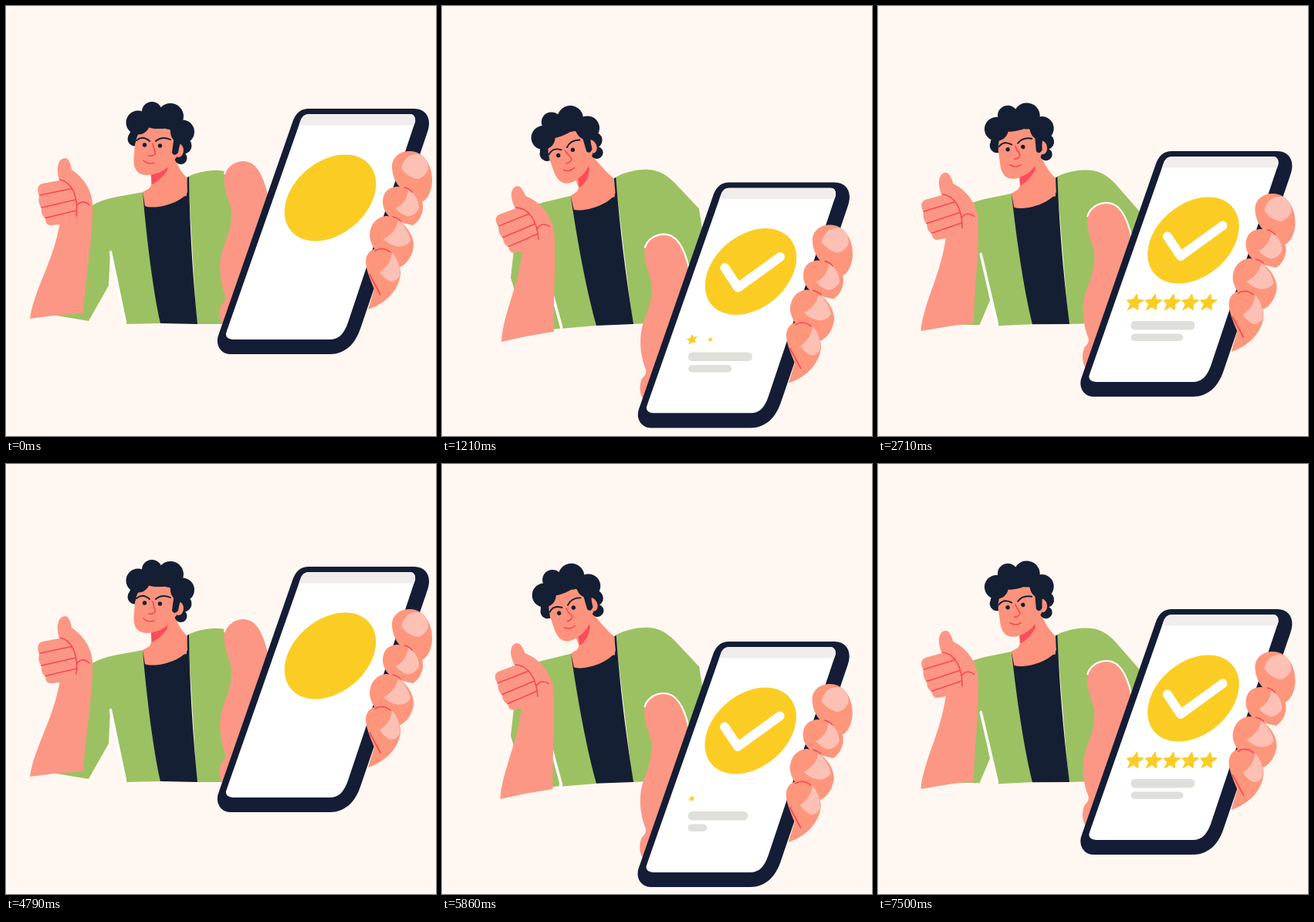
An HTML page that plays this animation: 557x557 px, repeating every 9.57 s.

```html
<!DOCTYPE html>
<html lang="en">
<head>
<meta charset="utf-8">
<title>Thumbs up</title>
<style>
  html, body { margin: 0; width: 100%; height: 100%; overflow: hidden; background: #fff7f1; }
  svg { display: block; width: 100vw; height: 100vh; }
  .green { fill: #9cc162; }
  .dark { fill: #151f33; }
  .skin { fill: #fc9785; }
  .face { fill: #fd937c; }
  .tip { fill: #fe967c; }
  .nail { fill: #fdc0b5; }
  .gold { fill: #fbcd24; }
  .grey { fill: #dfe0da; }
  .line { fill: none; stroke-linecap: round; stroke-linejoin: round; }
  .red { stroke: #ff4455; stroke-width: 1.6; }
  .white { stroke: #fff; }
  .brow { stroke: #151f33; stroke-width: 1.9; }
</style>
</head>
<body>
<svg viewBox="0 0 557 557">
  <defs>
    <clipPath id="screen"><path d="M392 140H524Q531 141 530 150L443 410C438 424 432 432 419 432H294Q284 431 285 424L287 418L381 150Q384 140 392 140Z"/></clipPath>
  </defs>

  <path id="sleeve" class="green"/>
  <g id="body">
    <path class="green" d="M178 241L150 246Q125 250 112 258L122 312L136 316L156 412L202 411Z"/>
    <path class="line white" stroke-width="3.6" d="M135.5 319L154.5 410"/>
    <path class="green" d="M236 221C250 214 268 212 280 213.5C294 215 304 223 312 232L342 268L345 300L300 412H247Z"/>
    <path class="face" d="M177 241L188 235L234 222L237 246L205 268L178 262Z"/>
    <path class="dark" d="M177 241L180 259C190 264 226 257 235 241L234.5 222L237 221C238 290 242 350 248 412L200 411C190 366 182 300 177 241Z"/>
  </g>
  <path id="neck" class="face"/>
  <path id="shade" fill="#fc4c5b"/>

  <g id="head">
    <g class="dark">
      <circle cx="167" cy="172" r="9.5"/><circle cx="230" cy="181" r="10.5"/><circle cx="226.500" cy="197" r="8"/>
    </g>
    <path class="face" d="M169 158L167 180L165.5 199Q165 219 183 219Q199 218 209 209L221 196L222 156Z"/>
    <ellipse class="face" cx="223.500" cy="187" rx="6.500" ry="9"/>
    <g class="dark">
      <circle cx="171" cy="151" r="15.5"/><circle cx="189" cy="137" r="13"/>
      <circle cx="213" cy="143" r="17"/><circle cx="228.500" cy="163" r="15.5"/>
      <ellipse cx="198" cy="148" rx="26" ry="11"/>
      <path d="M160 165L167.500 178Q169 166 178 157L172 145Z"/>
      <path d="M205 152L218 167L215 190Q218 196 223 190Q225 176 230 172L228 152Z"/>
      <circle cx="179.5" cy="180" r="2.7"/><circle cx="199.5" cy="181" r="2.7"/>
    </g>
    <path class="line brow" d="M169 174Q177 167 186 175M194 175Q202 168 213 173"/>
    <path class="line red" d="M190 178Q191 184 193.5 190Q192 195 185 194M178 200Q184 206 192 203"/>
  </g>

  <g id="arm">
    <path class="skin" d="M31 405C36 368 62 330 70 280L90 250L112 256C113 300 104 340 100 398Q65 400 31 405Z"/>
    <g id="fist">
      <path class="skin" d="M70 283L58 284Q51 284 51 275Q45 271 46 262Q41 256 43 246Q38 233 47 230L69 226Q66 216 67 208Q69 197 77 197Q83 198 85 212C100 222 111 238 112 256L111 282Z"/>
      <path class="line red" d="M44 245L85 236.5M46 261L90 251M51 274.5L91 265M70 225C85 228 94 246 91 272M92 258C97 252 103 253 108 258"/>
    </g>
  </g>

  <g id="phone">
    <path class="skin" d="M283 218C286 207 296 200 308 200C326 200 336 225 341 248L345 290L300 415H281C276 406 275 398 279 387Q286 381 284 375C278 360 275 340 279 322C283 305 292 292 292 268C292 255 280 238 283 218Z"/>
    <path class="line white" stroke-width="2.2" d="M283 217C286 207 296 200 308 200C326 200 335 222 340 244"/>
    <path fill="#141d35" d="M392 133H529C543 133 550 144 547.5 157Q547 160 545 166L459 418C452 439 438 451 420 451H291C280 451 273 442 274 432Q274 429 276 424L372 148Q378 133 392 133Z"/>
    <g clip-path="url(#screen)">
      <path fill="#fff" d="M270 130H560V440H270Z"/>
      <path fill="#f1eded" d="M360 130H560V154.5H360Z"/>
    </g>
    <circle class="gold" r="56" transform="translate(420 248.5) skewX(-19)"/>
    <path id="check" class="line white" stroke-width="12" pathLength="100" d="M386.5 243.5L403.5 269L458 229.5"/>
    <rect id="bar1" class="grey" x="339" y="353" height="11.5"/>
    <rect id="bar2" class="grey" x="339" y="369.5" height="9.5"/>
    <g id="stars" class="gold" stroke="#fbcd24" stroke-width="1.4" stroke-linejoin="round"></g>
    <g class="tip">
      <path d="M466 330C467 320 473 314 483 314C500 316 512 332 511 348C508 370 490 386 469 393L477 367C471 352 466 341 466 330Z"/>
      <path d="M471 296C472 281 482 272 494 272C513 276 529 294 528 312C526 324 520 333 511 338L492 328C479 320 471 308 471 296Z"/>
      <path d="M488 254C488 240 497 234 508 234C526 235 541 245 540 262C539 272 534 280 527 284L505 279C495 274 488 264 488 254Z"/>
      <path d="M500 210C499 196 510 188 523 188C542 188 553 208 552 228C551 242 545 252 538 254L520 242C508 236 501 224 500 210Z"/>
    </g>
    <g class="nail">
      <path d="M512 210C515 198 522 192 531 192C541 192 547 200 547 212C543 220 537 224 532 224C524 222 516 217 512 210Z"/>
      <path d="M505 262C515 257 520 248 521 238C530 243 535 252 535 262C531 270 524 273 519 272Q510 269 505 262Z"/>
      <path d="M489 302C500 296 506 288 508 278C518 286 523 296 524 304C519 311 511 313 505 311Q496 309 489 302Z"/>
      <path d="M484 345C494 338 499 330 500 319C508 328 511 340 510 350C505 357 500 358 496 356Q489 352 484 345Z"/>
    </g>
    <path class="line red" d="M516 235Q522 236 526 241M501 273Q506 274 511 278M478 317Q488 311 498 319M471 348L485 374"/>
  </g>
</svg>

<script>
// Time n counts steps of 1/14 s; each cycle rises, dips, settles and holds.
const LOOP = 9570, FPS = 14, CYCLE = 67;
const $ = id => document.getElementById(id);
const clamp = v => Math.max(0, Math.min(1, v));
const smooth = v => (v = clamp(v), v * v * (3 - 2 * v));
const cubic = v => (v = clamp(v), v < .5 ? 4 * v ** 3 : 1 - 4 * (1 - v) ** 3);
const move = (el, value) => el.setAttribute('transform', value);
const show = (el, on) => el.setAttribute('visibility', on ? 'visible' : 'hidden');

// Lean in to 1.07, then fall back to the resting amount
const sway = (n, rest) => 1.07 * smooth((n - 2.5) / 14) - (1.07 - rest) * smooth((n - 18) / 10);

function turn(x, y, cx, cy, deg) {
  const r = deg * Math.PI / 180, c = Math.cos(r), s = Math.sin(r);
  return [cx + (x - cx) * c - (y - cy) * s, cy + (x - cx) * s + (y - cy) * c];
}

const starShape = Array.from({ length: 10 }, (_, i) => {
  const r = i % 2 ? 5 : 11, a = i * Math.PI / 5;
  return (r * Math.sin(a)).toFixed(2) + ',' + (-r * Math.cos(a)).toFixed(2);
}).join(' ');
const stars = Array.from({ length: 5 }, () => {
  const star = document.createElementNS('http://www.w3.org/2000/svg', 'polygon');
  star.setAttribute('points', starShape);
  return $('stars').appendChild(star);
});

function drawBody(k) {
  const lean = -3.3 * k, nod = -23 * k ** .7;
  const dx = -27.5 * k, dy = 9 * k;
  const body = (x, y) => turn(x, y, 248, 412, lean);
  const head = (x, y) => {
    const [a, b] = turn(x, y, 189, 180.5, nod);
    return [a + dx, b + dy];
  };
  move($('body'), `rotate(${lean} 248 412)`);
  move($('head'), `translate(${dx} ${dy}) rotate(${nod} 189 180.5)`);
  $('neck').setAttribute('d', `M${body(184, 239)}L${body(188, 232)}L${head(188, 208)}L${head(216, 186)}L${head(220, 200)}Q${body(225, 214)} ${body(234, 222)}L${body(234, 246)}L${body(190, 252)}Z`);
  $('shade').setAttribute('d', `M${body(188, 221)}L${head(186, 212)}L${head(210, 205)}L${head(209, 213)}Q${body(200, 226)} ${body(189, 231)}Z`);
  return body;
}

function drawArm(k, body) {
  const x = 31 + 43 * k, y = 405 + 28 * k;
  move($('arm'), `translate(${x} ${y}) rotate(${-5 * k}) scale(1 ${1 - .03 * k}) translate(-31 -405)`);
  move($('fist'), `rotate(${-5 * k} 100 270)`);
  $('sleeve').setAttribute('d', `M${body(112, 258)}L94,308L89,352L${x + 34},${y - 4 - 8 * k}L${x + 76},${408 + 9 * k}L${133 + 21 * k},${362 + 34 * k}L${body(135, 318)}L${body(150, 280)}Z`);
}

function drawBar(bar, full, grow) {
  const w = full * cubic(grow);
  bar.setAttribute('width', w);
  bar.setAttribute('rx', Math.min(5.5, w / 4));
}

function drawPhone(n) {
  const y = 97 * smooth((n - 1.4) / 12.1) - 42 * smooth((n - 16) / 9.2);
  move($('phone'), `translate(${-.21 * y} ${y})`);

  const drawn = 100 * clamp((n - 3) / 5);
  $('check').setAttribute('stroke-dasharray', drawn + ' 200');
  show($('check'), drawn > 0);
  drawBar($('bar1'), 83, (n - 7.5) / 10);
  drawBar($('bar2'), 68, (n - 10.5) / 10);

  stars.forEach((star, i) => {
    const u = clamp((n - 12.5 - 2.5 * i) / 15.5);
    const size = u + .38 * Math.sin(Math.PI * u);
    const drop = 7 * smooth((1 - u) * 3);
    move(star, `translate(${344 + 23.8 * i} ${329.5 + drop}) skewX(-14) rotate(${40 * (size - 1)}) scale(${size})`);
    show(star, u > 0);
  });
}

function render(ms) {
  const n = Math.floor((ms % LOOP + 5) * FPS / 1000) % CYCLE;
  drawArm(sway(n, .57), drawBody(sway(n, .42)));
  drawPhone(n);
}

const start = performance.now();
function tick(now) {
  render(Math.max(0, now - start));
  requestAnimationFrame(tick);
}
render(0);
requestAnimationFrame(tick);
</script>
</body>
</html>
```
